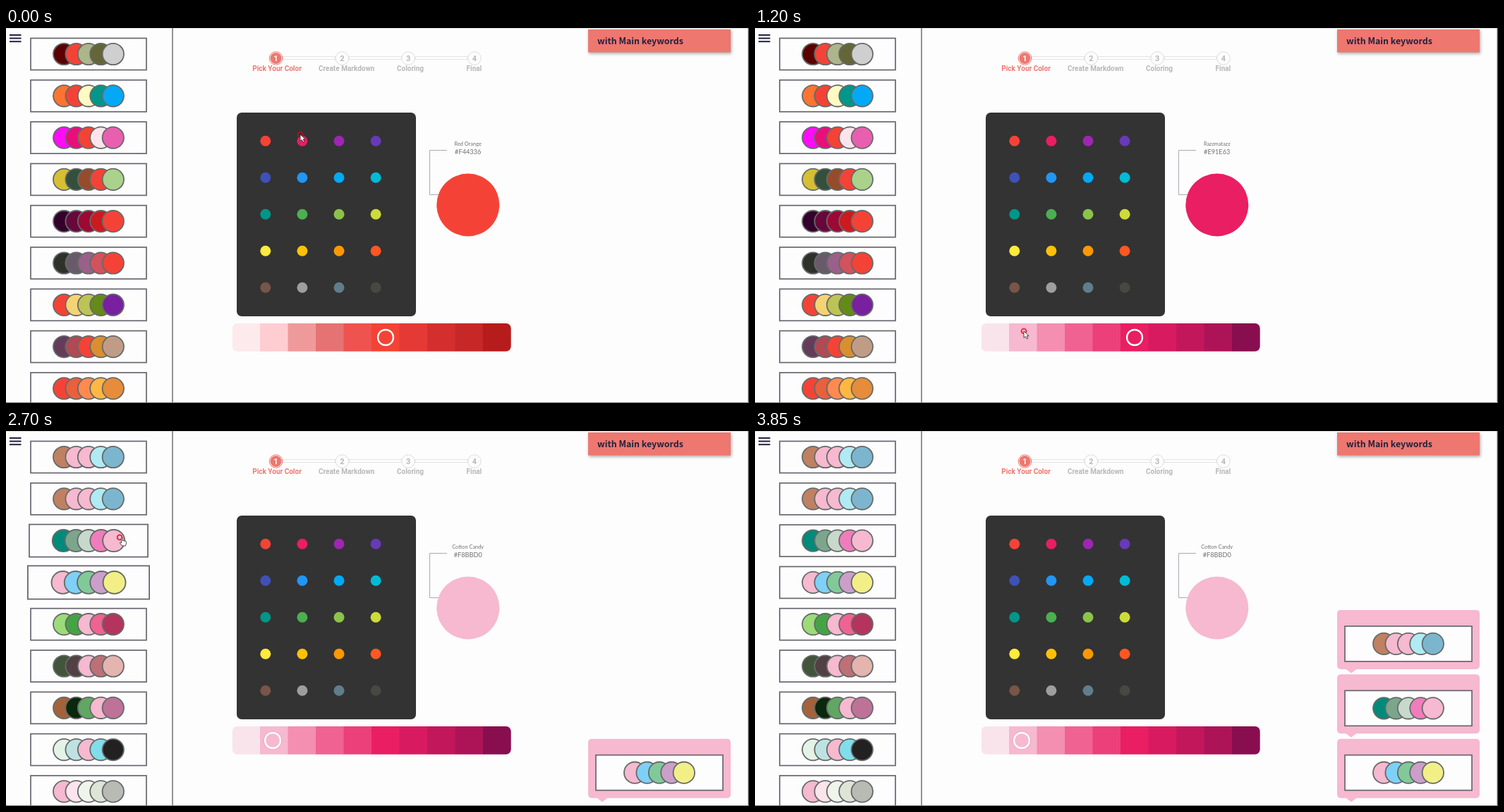
Animation, 1053 px wide and 532 px high, one loop 3900 ms. Source, as an HTML page:

```html
<!DOCTYPE html>
<html lang="en">
<head>
<meta charset="utf-8">
<title>Palette picker</title>
<style>
  html, body { margin: 0; width: 100%; height: 100%; overflow: hidden; background: #fdfdfd; }
  svg { display: block; }
  .step { font: 700 10px Roboto, sans-serif; text-anchor: middle; }
  .num { font: 700 11px Roboto, sans-serif; text-anchor: middle; }
  .info { font-family: Lato, sans-serif; text-anchor: middle; fill: #707070; }
  .toast { font: 700 12.4px "Noto Sans CJK JP", "Noto Sans CJK SC", "Noto Sans", sans-serif; fill: #22223c; }
</style>
</head>
<body>
<svg id="stage" width="1053" height="532" viewBox="0 0 1053 532"></svg>
<script>
const LOOP = 3900, STEP = 50;
const NS = "http://www.w3.org/2000/svg";
const stage = document.getElementById("stage");
const CORAL = "#ee7770", LINE = "#686670", CANDY = "#f6b9cf";

const hexes = s => s.split(" ").map(c => "#" + c);
const before = [
  "5a0000 f44336 adb58a 646638 cfcfcf", "fb7430 f44336 fff9c4 00968a 03a9f4",
  "ff0cf8 e80f7c f44336 fce4ec e95fb0", "d6bf33 33503c 964c2b f44336 aad28a",
  "33002c 68083a 9d0834 cc1a1e f44336", "2e312a 695a6a 99608a d2525e f44336",
  "f44336 f4d375 bcc456 648b18 7820a0", "643c5a b04a54 f44336 d98f30 c09c86",
  "f44336 e8603c ff8a50 ffb742 e68c3a"].map(hexes);
const after = [
  "c08062 f6b9cf f6b9cf b0ebf4 7cb6ce", "c08062 f6b9cf f6b9cf b0ebf4 7cb6ce",
  "008a7a 7ba68c c8d9cc f07cbc f6b9cf", "f6b9cf 7ed0f6 82c99a cb9fca f2ef86",
  "9cdb78 45a345 f6b9cf f06292 b4345e", "42543a 524044 f6b9cf bd7076 e4b4ae",
  "a4623a 0a280c 62a664 f6b9cf be7298", "e4f2e8 bee2e2 f6b9cf 80deea 222020",
  "f6b9cf fce4ec eff5ea dee4d6 b8bab4"].map(hexes);
const reds = hexes("fdeaed fdcdd2 ef9a9a e57373 ef5350 f44336 e53935 d32f2f c62828 b71c1c");
const pinks = hexes("fae4ec f6b9cf f48fb1 f06292 ec407a e91e63 d81b60 c2185b ad1457 880e4f");
const dots = hexes("f44336 e91e63 9c27b0 673ab7 3f51b5 2196f3 03a9f4 00bcd4 009688 4caf50 " +
  "8bc34a cddc39 ffeb3b ffc107 ff9800 ff5722 795548 9e9e9e 607d8b 484842");

function el(tag, attrs, parent = stage, text) {
  const node = document.createElementNS(NS, tag);
  set(node, attrs);
  if (text) node.textContent = text;
  return parent.appendChild(node);
}
function set(node, attrs) {
  for (const k in attrs) node.setAttribute(k, attrs[k]);
}
const rect = (x, y, width, height, fill, more, parent) =>
  el("rect", { x, y, width, height, fill, ...more }, parent);
const circle = (cx, cy, r, fill, more, parent) =>
  el("circle", { cx, cy, r, fill, ...more }, parent);
const zoom = (node, x, y, s) =>
  node.setAttribute("transform", `translate(${x} ${y}) scale(${s})`);

// A framed row of five overlapping discs, centred on its own origin
function palette(parent, w, h, colors) {
  rect(-w / 2, -h / 2, w, h, "#fdfdfd", { stroke: LINE, "stroke-width": 1.7 }, parent);
  return colors.map((c, i) =>
    circle((i - 2) * 17.4, 0, 15.2, c, { stroke: "#666a6a", "stroke-width": 1.8 }, parent));
}

// Page edges and sidebar
rect(0, 0, 1053, 532, "#fdfdfd");
rect(0, 0, 1053, 1, "#dddddd");
for (const y of [9, 13.6, 18.2]) rect(5, y, 16.5, 2, "#22223c");
const rows = before.map((colors, i) => {
  const g = el("g", {});
  return { g, y: 37 + i * 59.3, discs: palette(g, 164, 45, colors) };
});
rect(235.3, 0, 1.4, 532, "#66666c");

// Stepper
["Pick Your Color", "Create Markdown", "Coloring", "Final"].forEach((label, i) => {
  const x = 382.5 + i * 93.8, on = i === 0;
  if (i < 3) rect(x + 10, 40.5, 74, 4, "#fdfdfd", { stroke: "#e2e2e2", "stroke-width": .9 });
  circle(x, 43, 9.3, "#fdfdfd", { stroke: on ? CORAL : "#dcdcdc", "stroke-width": 1 });
  if (on) circle(x, 43, 8, CORAL);
  el("text", { class: "num", x, y: 47, fill: on ? "#fff" : "#b8b8b8" }, stage, String(i + 1));
  el("text", { class: "step", x: [384, 482.7, 573, 663.4][i], y: 61.3, fill: on ? CORAL : "#b8b8b8" },
    stage, label);
});

// Toast
rect(825, 2, 202, 32.5, CORAL, { style: "filter:drop-shadow(1px 2px 2px #0005)" });
el("text", { class: "toast", x: 838, y: 23 }, stage, "with Main keywords");

// Colour board
rect(327, 120, 254, 289, "#333333", { rx: 7 });
const boardDots = dots.map((c, i) => circle(367.8 + i % 4 * 52.1, 160.3 + (i >> 2) * 52, 7.5, c));

// Chosen colour
el("path", { d: "M625 173.5H600.5V236.5H616", fill: "none", stroke: "#a9a9b8" });
const name = el("text", { class: "info", x: 654.7, y: 167, "font-size": 7.4 });
const code = el("text", { class: "info", x: 654.7, y: 179.3, "font-size": 9.2 });
const big = circle(654.8, 251, 44.5, reds[5]);

// Shade bar
const clip = el("clipPath", { id: "bar" }, el("defs", {}));
rect(320.7, 419, 395, 39.7, "#000", { rx: 7 }, clip);
const bar = el("g", { "clip-path": "url(#bar)" });
const shades = reds.map((c, i) => rect(320.5 + i * 39.5, 419, 40, 40, c, {}, bar));
const knobShade = circle(538, 439, 12, "none", { stroke: "#0002", "stroke-width": 1.6 });
const knob = circle(538, 439, 11, reds[5], { stroke: "#fff", "stroke-width": 2.4 });

// Saved palettes, stacked upwards
const cards = [[3, 2400], [2, 2850], [0, 3450]].map(([row, start], i) => {
  const g = el("g", {});
  rect(-101, -42, 202, 84, CANDY, { rx: 5 }, g);
  el("path", { d: "M-89 41.5h16l-8 6z", fill: CANDY }, g);
  const inner = el("g", { transform: "translate(0 6)" }, g);
  palette(inner, 180, 50, after[row]);
  return { g, start, y: 478.7 - i * 91.4 };
});

rect(1051.7, 0, 1.3, 532, "#444448");
rect(0, 531, 1053, 1, "#77777b");

// Pointer
const pointer = el("g", {});
const ring = circle(0, 0, 3.4, "none", { "stroke-width": 1.9 }, pointer);
const ink = { fill: "#fff", stroke: "#222", "stroke-width": .8, "stroke-linejoin": "round" };
const arrow = el("path", { d: "M0 0V9.5L2.3 7.5L4 11L5.8 10.2L4.2 6.8H7.2Z", ...ink }, pointer);
const hand = el("path", {
  d: "M2.6 1.2Q3.5 .2 4.4 1.2V4.8Q5.4 4 6.2 5Q7.2 4.5 7.8 5.5Q9.2 5 9.3 6.6V9L8.4 12H3.7L.4 8.2" +
     "Q.4 6.8 1.7 7.2L2.6 8Z", ...ink }, pointer);

const path = [
  [0, 417, 151], [100, 414, 157], [500, 414, 157], [1100, 381, 430], [1350, 381, 430],
  [1750, 117, 36], [1850, 117, 36], [2200, 153, 202], [2500, 153, 202],
  [2750, 162, 145], [3050, 162, 145], [3300, 118, 38], [3900, 118, 38]];
const clicks = [150, 1250, 2350, 2850, 3400];
const hovers = [
  [2, 1600, 1650], [1, 1650, 1700], [0, 1700, 1900], [1, 1900, 2000], [2, 2000, 2150],
  [3, 2200, 2600], [2, 2650, 3150], [1, 3150, 3250], [0, 3250, 3600]];

const clamp = v => Math.max(0, Math.min(1, v));
const smooth = v => v * v * (3 - 2 * v);
const FADE = 200;
function hoverLevel(t, from, to) {
  const top = clamp((Math.min(t, to) - from) / FADE);
  return t < to ? top : Math.max(0, top - (t - to) / FADE);
}
function pointerAt(t) {
  const i = path.findIndex((p, n) => t < path[n + 1][0]);
  const [t0, x0, y0] = path[i], [t1, x1, y1] = path[i + 1];
  const k = smooth((t - t0) / (t1 - t0));
  return [x0 + (x1 - x0) * k, y0 + (y1 - y0) * k];
}
function pop(v) {
  return v < .6 ? 1.03 * smooth(v / .6) : 1.03 - .03 * clamp((v - .6) / .4);
}

function draw(t) {
  const pink = t >= 200, candy = t >= 1300;
  const color = candy ? CANDY : pink ? pinks[5] : reds[5];
  name.textContent = candy ? "Cotton Candy" : pink ? "Razzmatazz" : "Red Orange";
  code.textContent = candy ? "#F8BBD0" : pink ? "#E91E63" : "#F44336";
  set(big, { fill: color });
  shades.forEach((s, i) => set(s, { fill: (pink ? pinks : reds)[i] }));
  set(knob, { fill: color, cx: candy ? 378 : 538 });
  set(knobShade, { cx: candy ? 378 : 538 });
  set(boardDots[1], { r: 7.5 + 3.7 * hoverLevel(t, 50, 600) });

  const sets = t >= 1500 ? after : before;
  rows.forEach((row, i) => {
    row.discs.forEach((d, n) => set(d, { fill: sets[i][n] }));
    const levels = hovers.filter(h => h[0] === i).map(h => hoverLevel(t, h[1], h[2]));
    zoom(row.g, 117, row.y, 1 + .1 * Math.max(0, ...levels));
  });
  for (const c of cards) zoom(c.g, 926, c.y, t < c.start ? 0 : pop((t - c.start) / 200));

  const [x, y] = pointerAt(t);
  const onLink = t >= 50 && t < 600 || hovers.some(h => t >= h[1] && t < h[2]);
  const flash = clicks.some(c => t > c && t <= c + 200);
  set(pointer, { transform: `translate(${x} ${y})`, visibility: t < 3750 ? "visible" : "hidden" });
  set(ring, { r: flash ? 4.6 : 3.4, stroke: flash ? "#6fb4d8" : t < 50 ? "#b01020" : "#e8283c" });
  set(arrow, { display: onLink ? "none" : "inline" });
  set(hand, { display: onLink ? "inline" : "none" });
}

const origin = performance.now();
function tick() {
  const t = (performance.now() - origin) % LOOP;
  draw(Math.floor(t / STEP) * STEP);
  requestAnimationFrame(tick);
}
tick();
</script>
</body>
</html>
```
